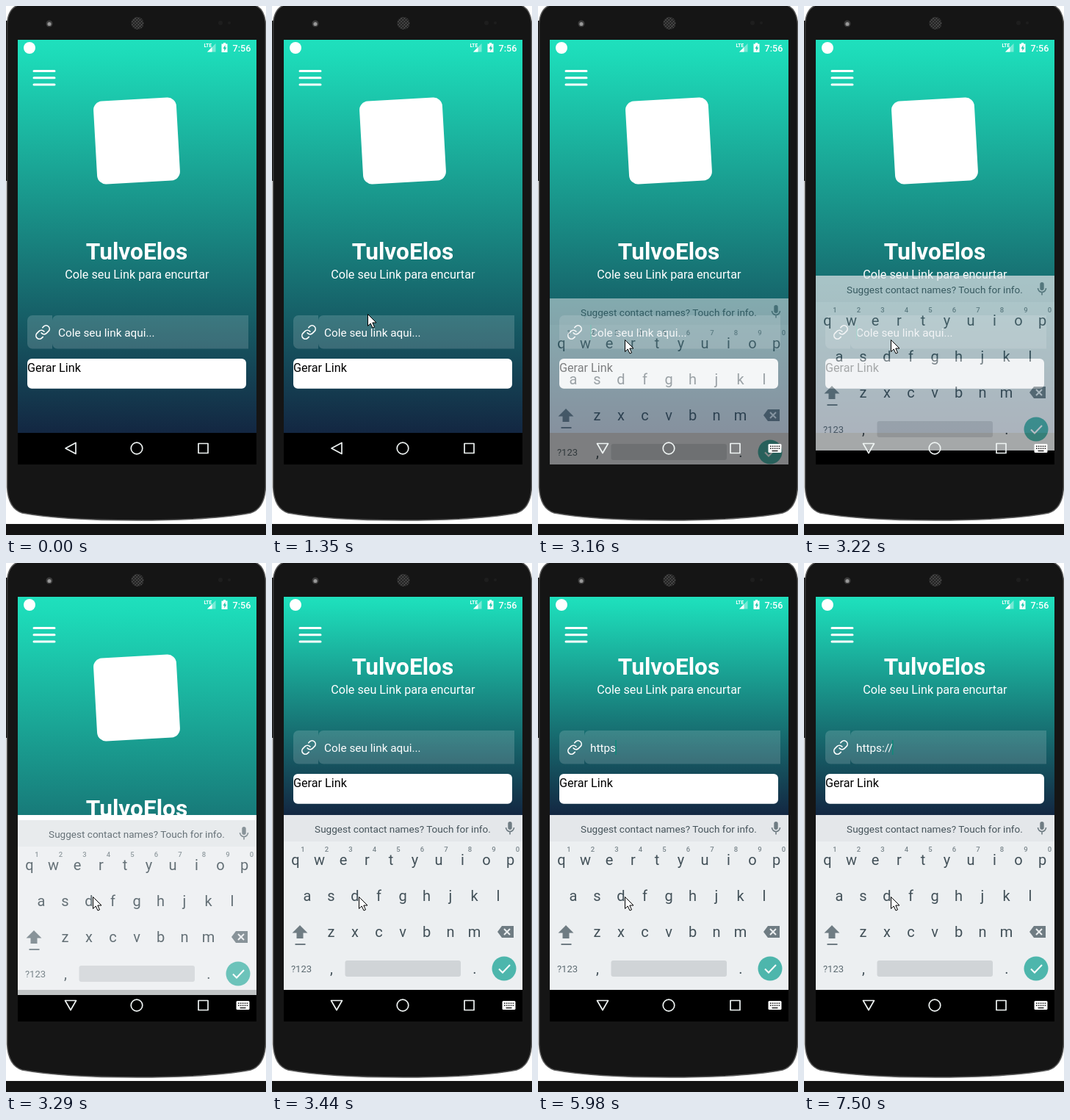
Write an HTML page that moves like this. It is 354 px wide and 720 px high and loops after 8000 ms.

```html
<!DOCTYPE html>
<html lang="pt">
<head>
<meta charset="utf-8">
<title>Encurtador de links</title>
<style>
  html, body { margin: 0; width: 100%; height: 100%; overflow: hidden; background: #fff; }
  svg { display: block; width: 100vw; height: 100vh; }
  text { font-family: Roboto, sans-serif; white-space: pre; }
  .mid { text-anchor: middle; }
  .line { fill: none; stroke: #fff; stroke-width: 2; stroke-linecap: round; stroke-linejoin: round; }
  .nav { fill: none; stroke: #eef3f2; stroke-width: 1.7; stroke-linejoin: round; }
  .key { font-size: 20px; fill: #435159; text-anchor: middle; }
  .hint { font-size: 9.5px; font-weight: 500; fill: #7a868c; text-anchor: middle; }
</style>
</head>
<body>
<svg viewBox="0 0 354 720" preserveAspectRatio="none">
  <defs>
    <linearGradient id="sky" gradientUnits="userSpaceOnUse" x1="0" y1="46" x2="0" y2="580">
      <stop offset="0" stop-color="#1fe0bd"/>
      <stop offset=".04" stop-color="#1ddbb9"/>
      <stop offset="1" stop-color="#132742"/>
    </linearGradient>
    <pattern id="mesh" width="3" height="3" patternUnits="userSpaceOnUse" patternTransform="rotate(45)">
      <rect width="3" height="3" fill="#1c1c1c"/>
      <circle cx="1.5" cy="1.5" r=".9" fill="#666"/>
    </pattern>
    <clipPath id="screen"><rect x="16" y="46" width="325" height="578"/></clipPath>
    <clipPath id="window"><rect x="16" y="46" width="325" height="535"/></clipPath>
  </defs>

  <!-- phone body -->
  <rect width="354" height="720" fill="#fff"/>
  <rect y="705" width="354" height="15" fill="#131313"/>
  <path d="M1.5 24Q3 4 16-1H339Q352 4 353.500 24V655Q352 684 333 690Q280 700 178 700Q76 700 22 690Q3 684 1.5 655Z"
        fill="#151515" stroke="#5a5a5a" stroke-width="1.5"/>
  <rect y="20" width="1.500" height="218" fill="#151515"/>
  <circle cx="59" cy="24" r="4.500" fill="#3c3c3c"/>
  <circle cx="59" cy="24.500" r="2.500" fill="#999"/>
  <circle cx="179" cy="23.5" r="8.5" fill="url(#mesh)"/>
  <circle cx="292" cy="23" r="3" fill="#1e1e1e"/>
  <circle cx="304" cy="23" r="2" fill="#1e1e1e"/>

  <!-- app -->
  <g clip-path="url(#window)">
    <rect x="16" y="46" width="325" height="535" fill="url(#sky)"/>
    <rect id="logo" x="121.5" y="127" width="113" height="113" rx="12" fill="#fff" transform="rotate(-3.2 178 183.5)"/>
    <g id="content">
      <text class="mid" x="178" y="345" font-size="31.6" font-weight="700" fill="#fff">TulvoElos</text>
      <text class="mid" x="178.300" y="371" font-size="16.2" fill="#fff">Cole seu Link para encurtar</text>
      <g fill="#fff" fill-opacity=".16">
        <path d="M63 421H36a7 7 0 0 0-7 7v31.500a7 7 0 0 0 7 7h27z"/>
        <path d="M330 421H70a7 7 0 0 0-7 7v31.500a7 7 0 0 0 7 7h260z"/>
      </g>
      <path class="line" style="stroke-width:1.800" transform="translate(39 433) scale(.92)"
            d="M10 13a5 5 0 0 0 7.540.54l3-3a5 5 0 0 0-7.070-7.070l-1.720 1.710M14 11a5 5 0 0 0-7.540-.54l-3 3a5 5 0 0 0 7.070 7.070l1.710-1.710"/>
      <text id="field" x="71" y="450" font-size="15.35" fill="#fff"></text>
      <rect id="caret" y="434" width="1.6" height="20" fill="#0f8a7a"/>
      <rect x="29" y="480" width="298" height="40.700" rx="6" fill="#fff"/>
      <text x="29" y="497.500" font-size="16.2" fill="#000">Gerar Link</text>
    </g>
    <path class="line" style="stroke-width:3" d="M38 88.500H66M38 97.800H66M38 107H66"/>
    <rect id="blank" x="16" y="343" width="325" height="238" fill="#fff"/>
  </g>

  <!-- status bar -->
  <g fill="#fff">
    <circle cx="32" cy="57" r="8"/>
    <text x="269.500" y="55.500" font-size="6.5" font-weight="700">LTE</text>
    <path d="M285.500 51V62.500H274z" fill-opacity=".4"/>
    <path d="M280.500 56V62.500H274z"/>
    <path d="M296 50h3v1.500h2.500v11.500h-8V51.500h2.500z"/>
    <path d="M298.500 53l-3 5h1.800v3.500l3-5h-1.800z" fill="#1fc9ac"/>
    <text x="308.500" y="61.500" font-size="12.6" font-weight="500">7:56</text>
  </g>

  <rect x="16" y="581" width="325" height="43" fill="#000"/>

  <g clip-path="url(#screen)">
    <g id="keyboard">
      <rect x="16" y="343" width="325" height="238" fill="#eceff1"/>
      <rect x="16" y="343" width="325" height="36" fill="#e4e7ea"/>
      <text class="mid" x="178" y="366.500" font-size="13.55" fill="#46545b">Suggest contact names? Touch for info.</text>
      <g fill="#6f7c83">
        <rect x="321.300" y="352" width="5.400" height="11" rx="2.700"/>
        <path d="M318.500 360a5.500 5.500 0 0 0 11 0M324 365.500v4" fill="none" stroke="#6f7c83" stroke-width="1.600"/>
        <path d="M38 493l10.500 10.500h-6v7.500h-9v-7.500h-6z"/>
        <rect x="31.500" y="518" width="14" height="2"/>
        <path d="M313 494h16v16h-16l-6-8z"/>
        <path d="M316 498l8 8m0-8l-8 8" stroke="#eceff1" stroke-width="2"/>
      </g>
      <g id="keys"></g>
      <text class="mid" x="40" y="556.500" font-size="13" fill="#5c6a71">?123</text>
      <rect x="99.500" y="541" width="157.500" height="22" rx="3" fill="#d0d4d7"/>
      <circle cx="316" cy="552" r="16.500" fill="#4db6ac"/>
      <path class="line" style="stroke-linecap:butt;stroke-linejoin:miter" d="M309 552.500l5 5L324 547"/>
    </g>
  </g>

  <!-- navigation bar -->
  <path id="back" class="nav"/>
  <circle class="nav" cx="178" cy="602" r="7.800"/>
  <rect class="nav" x="262" y="595.500" width="13" height="13"/>
  <g id="imeIcon">
    <rect x="313.500" y="596" width="18" height="12" rx="1.500" fill="#fff"/>
    <path d="M316 599.200h14M316 602.200h14" stroke="#222" stroke-width="1.600" stroke-dasharray="1.600 1.300"/>
    <path d="M318.500 605.500h8" stroke="#222" stroke-width="1.500"/>
  </g>

  <path id="pointer" d="M.5.5V16.500L4.200 13l2.800 6 2.500-1.100L6.800 12H12z" fill="#fff" stroke="#000" stroke-width="1"/>
</svg>

<script>
const LOOP = 8000;
const PLACEHOLDER = 'Cole seu link aqui...';
const URL_TEXT = 'https://';
const $ = id => document.getElementById(id);

// Each move: start, end, number of steps, target x, target y
const POINTER_START = [332, 709];
const MOVES = [
  [180, 940, 12, 141, 440],
  [1010, 1010, 1, 139, 436],
  [1210, 1350, 3, 130, 419],
  [2160, 2290, 3, 118, 454]
];

// Time, vertical offset, opacity
const SLIDE = [[3160, 55, .53], [3220, 24, .7], [3290, 7, .82], [3360, 2, .94], [3440, 0, 1]];
const KEYBOARD_AT = 3160, RESIZE_AT = 3290, COMPACT_AT = 3360;

const KEY_TIMES = [4630, 4970, 5240, 5510, 5980, 6910, 7240, 7500];
const CARET_ON = [[2830, 3360], [3840, 4300], [4630, 6580], [6910, LOOP]];

function addText(cls, x, y, value) {
  const node = document.createElementNS('http://www.w3.org/2000/svg', 'text');
  node.setAttribute('class', cls);
  node.setAttribute('x', x);
  node.setAttribute('y', y);
  node.textContent = value;
  $('keys').append(node);
}

function buildKeys() {
  const rows = [['qwertyuiop', 32, 411], ['asdfghjkl', 48, 460], ['zxcvbnm', 80.5, 509]];
  for (const [letters, x, y] of rows)
    [...letters].forEach((c, i) => addText('key', x + 32.5 * i, y, c));
  for (let i = 0; i < 10; i++) addText('hint', 42 + 32.5 * i, 393, (i + 1) % 10);
  addText('key', 81, 559, ',');
  addText('key', 276, 559, '.');
}

function pointerAt(t) {
  let [x, y] = POINTER_START;
  for (const [start, end, steps, tx, ty] of MOVES) {
    if (t < start) break;
    const gap = (end - start) / Math.max(1, steps - 1) || 1;
    const done = Math.min(steps, Math.floor((t - start) / gap + 1e-6) + 1);
    const k = done / steps;
    x += (tx - x) * k;
    y += (ty - y) * k;
  }
  return [x, y];
}

const show = (id, on) => $(id).setAttribute('visibility', on ? 'visible' : 'hidden');
const move = (id, x, y) => $(id).setAttribute('transform', `translate(${x} ${y})`);

function draw(t) {
  const open = t >= KEYBOARD_AT, compact = t >= COMPACT_AT;

  show('pointer', t >= MOVES[0][0]);
  move('pointer', ...pointerAt(t));

  show('logo', !compact);
  show('blank', t >= RESIZE_AT);
  move('content', 0, compact ? -193 : 0);
  $('sky').setAttribute('y2', compact ? 343 : 580);

  const [, offset, alpha] = SLIDE.filter(s => t >= s[0]).pop() || [0, 0, 0];
  show('keyboard', open);
  move('keyboard', 0, offset);
  $('keyboard').setAttribute('opacity', alpha);
  show('imeIcon', open);
  $('back').setAttribute('d', open ? 'M80.500 595.500H95.500L88 608.500Z' : 'M81 602L95 594.500V609.500Z');

  const typed = URL_TEXT.slice(0, KEY_TIMES.filter(k => t >= k).length);
  const field = $('field');
  field.textContent = typed || PLACEHOLDER;
  const width = typed ? field.getComputedTextLength() - .8 : 0;
  $('caret').setAttribute('x', 71 + width);
  show('caret', CARET_ON.some(([a, b]) => t >= a && t < b));
}

buildKeys();
const begin = performance.now();
function tick() {
  draw((performance.now() - begin) % LOOP);
  requestAnimationFrame(tick);
}
tick();
</script>
</body>
</html>
```
